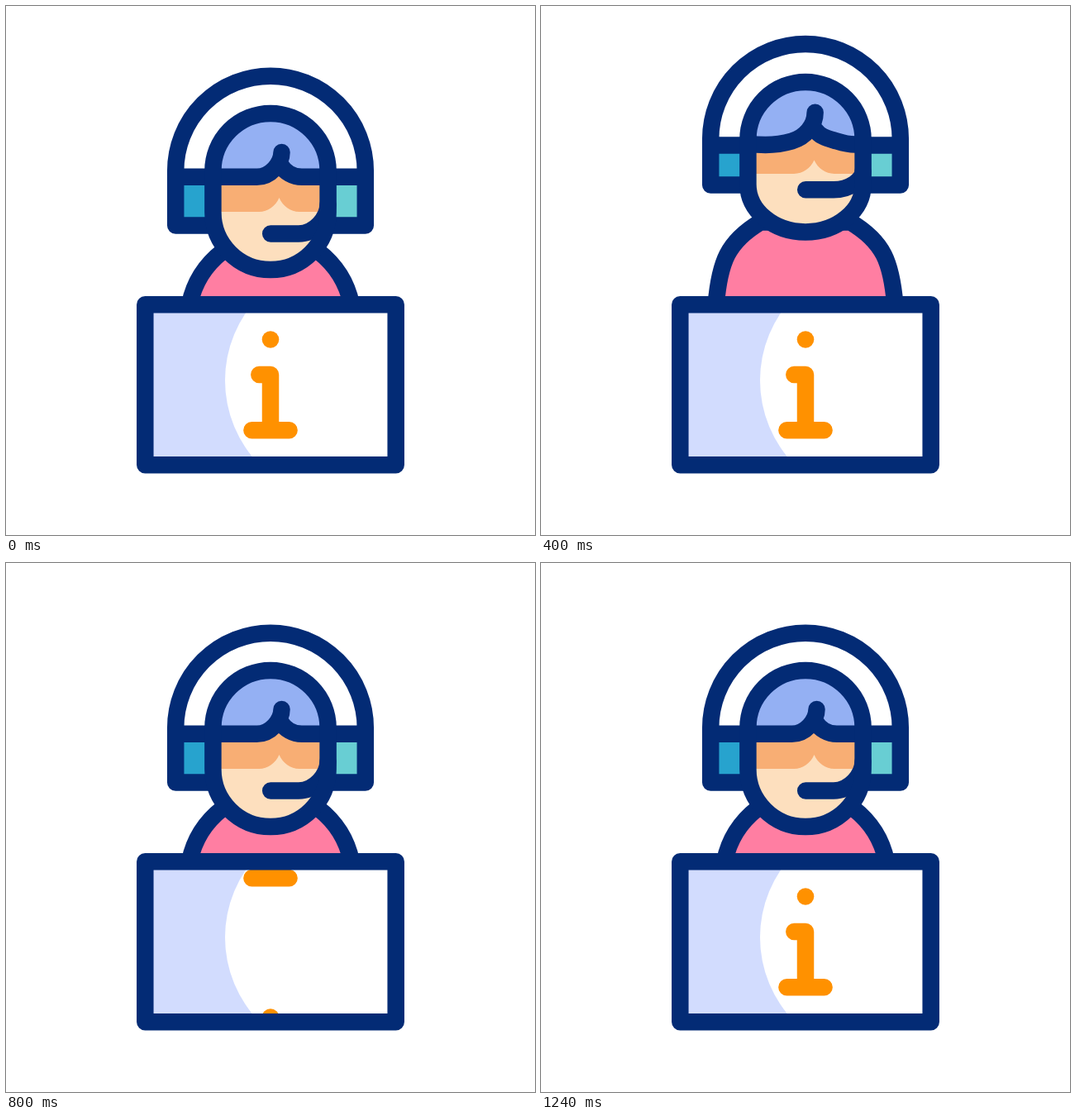
An HTML page with a canvas for the animation above (1.48 s loop, 640 by 640 pixels).

```html
<!DOCTYPE html>
<html lang="en">
<head>
<meta charset="utf-8">
<title>Help desk</title>
<style>
  html, body { margin: 0; width: 100%; height: 100%; overflow: hidden; background: #fff; }
  canvas { display: block; width: 640px; height: 640px; }
</style>
</head>
<body>
<canvas id="stage" width="640" height="640"></canvas>
<script>
const ctx = document.getElementById('stage').getContext('2d');
const LOOP = 1480, STEP = 40, LINE = 20.5, CX = 320;
const NAVY = '#032b75', ORANGE = '#ff9100', PINK = '#ff7ea2', SKIN = '#fddfbe',
      SHADE = '#f8ae74', HAIR = '#94b0f3', TEAL = '#27a3ce', MINT = '#68ced3', PALE = '#d2dcfe';

const ease = (t, start, length) => {
  const u = Math.min(1, Math.max(0, (t - start) / length));
  return (1 - Math.cos(Math.PI * u)) / 2;
};

// How far the figure is stretched upwards and squashed downwards
let up = 0, down = 0;
function setPose(t) {
  up = ease(t, 120, 240) - ease(t, 360, 200);
  down = ease(t, 360, 200) - ease(t, 560, 160);
}

// Blend of a resting value with its half-way stretched and squashed values
const mix = (rest, high, low) => rest + 2 * up * (high - rest) + 2 * down * (low - rest);

function fill(path, color) {
  ctx.fillStyle = color;
  ctx.fill(path);
}

function stroke(path, color = NAVY) {
  ctx.strokeStyle = color;
  ctx.stroke(path);
}

function shape(build) {
  const p = new Path2D();
  build(p);
  return p;
}

function clipped(path, draw) {
  ctx.save();
  ctx.clip(path);
  draw();
  ctx.restore();
}

function drawTorso() {
  const bx = mix(222, 216.3, 222);
  const ax = mix(227, 221, 227), ay = mix(337, 322, 337);
  const cx = mix(240, 232, 240), cy = mix(314, 298, 315);
  const tx = mix(262, 264, 262), ty = mix(297, 277, 300);
  const body = shape(p => {
    p.moveTo(bx, 361);
    p.bezierCurveTo(ax, ay, cx, cy, tx, ty);
    p.lineTo(640 - tx, ty);
    p.bezierCurveTo(640 - cx, cy, 640 - ax, ay, 640 - bx, 361);
  });
  fill(body, PINK);
  stroke(body);
}

function drawHeadset() {
  const arcY = mix(199.5, 177.3, 206.5);
  const band = mix(206.8, 184.1, 221);
  const base = mix(265.5, 238, 269.8);
  ctx.fillStyle = TEAL;
  ctx.fillRect(205, band, 45, base - band);
  ctx.fillStyle = MINT;
  ctx.fillRect(390, band, 45, base - band);
  stroke(shape(p => {
    p.moveTo(250, base);
    p.lineTo(205.2, base);
    p.lineTo(205.2, arcY);
    p.arc(CX, arcY, 114.8, Math.PI, 0);
    p.lineTo(434.8, base);
    p.lineTo(390, base);
    p.moveTo(205.2, band);
    p.lineTo(250, band);
    p.moveTo(390, band);
    p.lineTo(434.8, band);
  }));
}

function drawHead() {
  const r = 69.6, k = 0.5523;
  const crown = mix(199.5, 177.8, 206.3);
  const side = mix(249.5, 230, 257);
  const chin = mix(319, 293.8, 319);
  const head = shape(p => {
    p.arc(CX, crown, r, Math.PI, 0);
    p.lineTo(CX + r, side);
    p.bezierCurveTo(CX + r, side + (chin - side) * k, CX + r * k, chin, CX, chin);
    p.bezierCurveTo(CX - r * k, chin, CX - r, side + (chin - side) * k, CX - r, side);
    p.closePath();
  });

  const edge = mix(249, 223, 254), notch = mix(232, 206, 240.5);
  const shade = shape(p => {
    p.moveTo(240, 0);
    p.lineTo(240, edge);
    p.lineTo(306, edge);
    p.bezierCurveTo(317, edge, 326, notch + (edge - notch) * 0.6, 330.5, notch);
    p.bezierCurveTo(335, notch + (edge - notch) * 0.6, 344, edge, 355, edge);
    p.lineTo(400, edge);
    p.lineTo(400, 0);
  });

  // Fringe: two curves meeting beside the tip of the lock
  const end = mix(206.8, 184, 210.5), mid = mix(206.8, 182, 215), tilt = mix(0, 3, 0);
  const tipX = mix(333.5, 332.5, 333.2), tipY = mix(177, 149, 189.5);
  const joinX = mix(332, 332, 332.5), joinY = mix(192, 167.5, 204);
  const left = p => {
    p.bezierCurveTo(268, end + tilt / 2, 285, mid + tilt, 303.5, mid);
    p.bezierCurveTo(320, mid - tilt * 0.9, tipX, tipY + (mid - tipY) * 0.45, tipX, tipY);
  };
  const right = p => {
    p.bezierCurveTo(337.4, joinY + (mid - joinY) * 0.62, 347.3, mid - tilt * 0.6, 358, mid);
    p.bezierCurveTo(370, mid + tilt * 0.7, 380, end + tilt / 2, 389.6, end);
  };
  const hair = shape(p => {
    p.moveTo(250, 0);
    p.lineTo(250.4, end);
    left(p);
    p.lineTo(joinX, joinY);
    right(p);
    p.lineTo(390, 0);
  });
  const fringe = shape(p => {
    p.moveTo(250.4, end);
    left(p);
    p.moveTo(joinX, joinY);
    right(p);
  });

  const micY = mix(275.5, 245.3, 283), micEnd = mix(240, 217, 249);
  const mic = shape(p => {
    p.moveTo(320.2, micY);
    p.lineTo(354, micY);
    p.bezierCurveTo(354 + 35.5 * k, micY, 389.5, micEnd + (micY - micEnd) * (1 - k), 389.5, micEnd);
  });

  fill(head, SKIN);
  clipped(head, () => {
    fill(shade, SHADE);
    fill(hair, HAIR);
  });
  stroke(fringe);
  stroke(mic);
  stroke(head);
}

function drawDot(dy) {
  fill(shape(p => p.arc(CX, 403.5 + dy, 10.3, 0, 2 * Math.PI)), ORANGE);
}

function drawStem(dy) {
  stroke(shape(p => {
    p.moveTo(306.3, 446 + dy);
    p.lineTo(CX, 446 + dy);
    p.lineTo(CX, 513.2 + dy);
    p.moveTo(297.4, 513.2 + dy);
    p.lineTo(342.6, 513.2 + dy);
  }), ORANGE);
}

function drawLaptop(t) {
  const travel = 160;
  const screen = shape(p => p.rect(168.3, 361.3, 303.4, 194));
  const view = shape(p => p.rect(178, 371, 284, 174.5));
  fill(screen, PALE);
  clipped(view, () => {
    fill(shape(p => p.arc(411, 453, 146, 0, 2 * Math.PI)), '#fff');
    ctx.fillStyle = '#fff';
    ctx.fillRect(411, 361, 61, 194);
    drawStem(travel * ease(t, 420, 429));
    drawDot(travel * ease(t, 453, 429));
    if (t > 660) {
      drawStem(travel * (ease(t, 668, 481) - 1));
      drawDot(travel * (ease(t, 811, 429) - 1));
    }
  });
  stroke(screen);
}

function draw(t) {
  setPose(t);
  ctx.fillStyle = '#fff';
  ctx.fillRect(0, 0, 640, 640);
  ctx.lineWidth = LINE;
  ctx.lineCap = ctx.lineJoin = 'round';
  drawTorso();
  drawHeadset();
  drawHead();
  drawLaptop(t);
}

const begin = performance.now();
function tick() {
  const t = (performance.now() - begin) % LOOP;
  draw(Math.floor(t / STEP) * STEP);
  requestAnimationFrame(tick);
}
tick();
</script>
</body>
</html>
```
